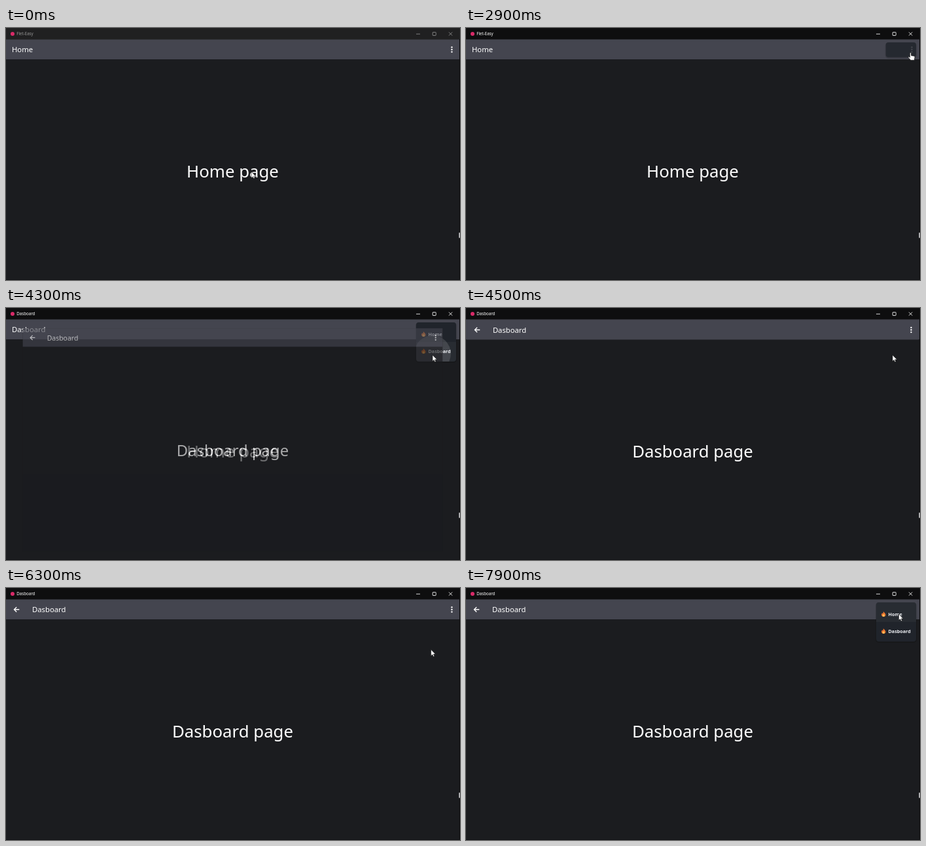
Write an HTML page that moves like this. It is 694 by 386 pixels and loops after 8000 ms.

```html
<!DOCTYPE html>
<html lang="en">
<head>
<meta charset="utf-8">
<title>Page navigation</title>
<style>
  html, body { margin: 0; width: 100%; height: 100%; overflow: hidden; background: #1b1c1f; }
  svg { display: block; width: 100vw; height: 100vh; }
  text { font-family: "Noto Sans", "Open Sans", sans-serif; fill: #fff; }
  .head { font-size: 11.3px; }
  .big { font-size: 25.8px; text-anchor: middle; }
  .item { font-size: 7.2px; font-weight: 700; fill: #eceef2; }
  .line { fill: none; stroke: currentColor; }
</style>
</head>
<body>
<svg id="stage" viewBox="0 0 694 386" xmlns="http://www.w3.org/2000/svg"></svg>
<script>
const LOOP = 8000, STEP = 100;
const MENU = { right: 688, top: 22, w: 61, h: 60 };

const page = (id, title, back) => `
  <g id="${id}">
    <rect y="17.5" width="693" height="368.5" fill="#1b1c1f"/>
    <rect y="17.5" width="693" height="30.5" fill="#44454f"/>
    ${back ? '<path d="M20.3 33H12.4M16.2 29.2L12.4 33L16.2 36.8" fill="none" stroke="#fff" stroke-width="1.3"/>' : ''}
    <text class="head" x="${back ? 40 : 9}" y="37.4">${title}</text>
    ${[29.4, 33, 36.6].map(y => `<circle cx="681.5" cy="${y}" r="1.2" fill="#fff"/>`).join('')}
    <text class="big" x="346.5" y="229.3">${title} page</text>
  </g>`;

const item = (label, y) => `
  <g transform="translate(638.3 ${y})">
    <path d="M-.4 -4.2C.3 -2.6 3.2 -1.5 3.2 1.2C3.2 3 1.8 4 0 4S-3.2 3 -3.2 1.1C-3.2 -.2 -2.6 -1 -2.1 -1.7L-1.3 -.6C-.6 -1.6 -.2 -2.8 -.4 -4.2Z" fill="#f0762e"/>
    <path d="M.1 -.2C.5 .8 1.7 1.1 1.6 2.4C1.5 3.4 .9 3.8 0 3.8S-1.6 3.3 -1.6 2.3C-1.6 1.3 -.2 .8 .1 -.2Z" fill="#ffc45c"/>
    <text class="item" x="7.2" y="2.6">${label}</text>
  </g>`;

document.getElementById('stage').innerHTML = `
  <defs><clipPath id="menuClip"><rect id="clipBox" rx="4"/></clipPath></defs>
  <rect width="694" height="386" fill="#101012"/>
  <rect id="bar" width="694" height="17.5"/>
  <circle cx="10" cy="9" r="3" fill="#d92a68"/>
  <text id="winTitle" x="16.2" y="11.3" font-size="6.2"></text>
  <g id="buttons" class="line" stroke-width=".9">
    <path d="M627 9.2H633M677 6.4L682.2 11.6M682.2 6.4L677 11.6"/>
    <rect x="652.2" y="6.5" width="5" height="5" rx=".6"/>
  </g>
  ${page('home', 'Home', false)}
  ${page('dash', 'Dasboard', true)}
  <circle id="hover" cx="681.5" cy="33" r="10" fill="#fff" opacity=".07"/>
  <g id="menu">
    <rect id="shade" rx="5" fill="#000" opacity=".16"/>
    <rect id="menuBox" rx="4" fill="#20242b"/>
    <g id="items" clip-path="url(#menuClip)">
      <rect id="row" x="627" width="61" height="30" fill="#fff" opacity=".035"/>
      <circle id="ripple" cx="652" cy="70" fill="#fff"/>
      ${item('Home', 40)}${item('Dasboard', 66)}
    </g>
  </g>
  ${page('enter', 'Dasboard', true)}
  <rect x="693" y="17" width="1" height="369" fill="#08080a"/>
  <rect y="385" width="694" height="1" fill="#121315"/>
  <rect x="692.4" y="313.5" width="1.6" height="8" fill="#c8c8c8"/>
  <path id="arrow" d="M0 0V9.6L2.2 7.6L3.6 10.8L5.2 10.1L3.8 7H6.8Z" fill="#fff" stroke="#111" stroke-width=".6"/>
  <path id="hand" d="M-.9 .6C-.9 -.5 1 -.5 1 .6V4.2L5.2 5C6.2 5.2 6.6 5.8 6.5 6.8L5.8 11.3H.2L-3.2 7.3C-3.8 6.4 -2.8 5.6 -2 6.2L-.9 7.2Z" fill="#fff" stroke="#111" stroke-width=".6"/>`;

const el = id => document.getElementById(id);
const set = (id, attrs) => { for (const k in attrs) el(id).setAttribute(k, attrs[k]); };
const show = (id, on) => set(id, { visibility: on ? 'visible' : 'hidden' });
const clamp = v => Math.max(0, Math.min(1, v));
const span = (t, a, b) => clamp((t - a) / (b - a));
const smooth = p => p * p * (3 - 2 * p);

// time, x, y of the pointer tip
const route = [
  [0, 375, 220], [100, 376, 219], [200, 376, 219], [1100, 692, 20], [1200, 694, 19],
  [1400, 694, 19], [1500, 689.5, 20], [1800, 679, 39], [1900, 679, 39], [2300, 678, 40],
  [2400, 678, 40], [2600, 679.5, 38], [2900, 679.5, 38], [3600, 652, 72], [4800, 652, 72],
  [5600, 644, 100], [5700, 644, 100], [6400, 650, 94], [6600, 650, 94], [7100, 684, 32],
  [7500, 684, 32], [7900, 661.5, 40], [8000, 661.5, 40]
];

function pointer(t) {
  const i = route.findIndex(k => k[0] > t);
  const [a, b] = [route[i - 1], route[i]];
  const p = smooth(span(t, a[0], b[0]));
  return [a[1] + (b[1] - a[1]) * p, a[2] + (b[2] - a[2]) * p];
}

function drawMenu(t) {
  const second = t > 7000;
  const open = second ? span(t, 7230, 7490) : span(t, 2790, 3080);
  const fade = second ? 1 : 1 - span(t, 4300, 4500);
  const w = MENU.w * Math.min(1, 2 * open), h = MENU.h * open;
  const x = MENU.right - w, y = MENU.top;
  const box = { x, y, width: w, height: h };
  set('menuBox', box);
  set('clipBox', box);
  set('shade', { x: x - 1, y, width: w + 2, height: h + 2 });
  set('menu', { opacity: Math.min(1, 2.2 * open) * fade });
  set('items', { opacity: span(open, .4, 1) });
  set('row', { y: second || t < 3300 ? 22 : 52 });
  const r = span(t, 3800, 4300);
  set('ripple', { r: 28 * r, opacity: second ? 0 : .13 * Math.min(1, r * 3) });
}

function draw(t) {
  const active = t >= 2800, moved = t >= 4100, done = t >= 4550;
  set('bar', { fill: active ? '#0e0e0f' : '#202021' });
  set('winTitle', { style: `fill:${active ? '#fff' : '#969696'}` });
  set('buttons', { color: active ? '#f2f2f2' : '#8b8b8b' });
  el('winTitle').textContent = moved ? 'Dasboard' : 'Flet-Easy';
  el('home').querySelector('.head').textContent = moved ? 'Dasboard' : 'Home';
  show('home', !done);
  show('dash', done);
  show('hover', (t >= 1700 && t < 2900) || (t >= 7100 && t < 7500));
  drawMenu(t);

  const p = span(t, 4200, 4550), scale = 1 - .145 * (1 - p) ** 2;
  show('enter', p > 0 && !done);
  set('enter', {
    opacity: Math.min(1, 2.2 * p),
    transform: `translate(346.5 201.5) scale(${scale}) translate(-346.5 -201.5)`
  });

  const [x, y] = pointer(t);
  const hand = (t >= 1700 && t < 3000) || (t >= 7100 && t < 7600);
  show('hand', hand);
  show('arrow', !hand);
  set(hand ? 'hand' : 'arrow', { transform: `translate(${x} ${y})` });
}

function frame() {
  draw(Math.floor((performance.now() % LOOP) / STEP) * STEP);
  requestAnimationFrame(frame);
}
frame();
</script>
</body>
</html>
```
